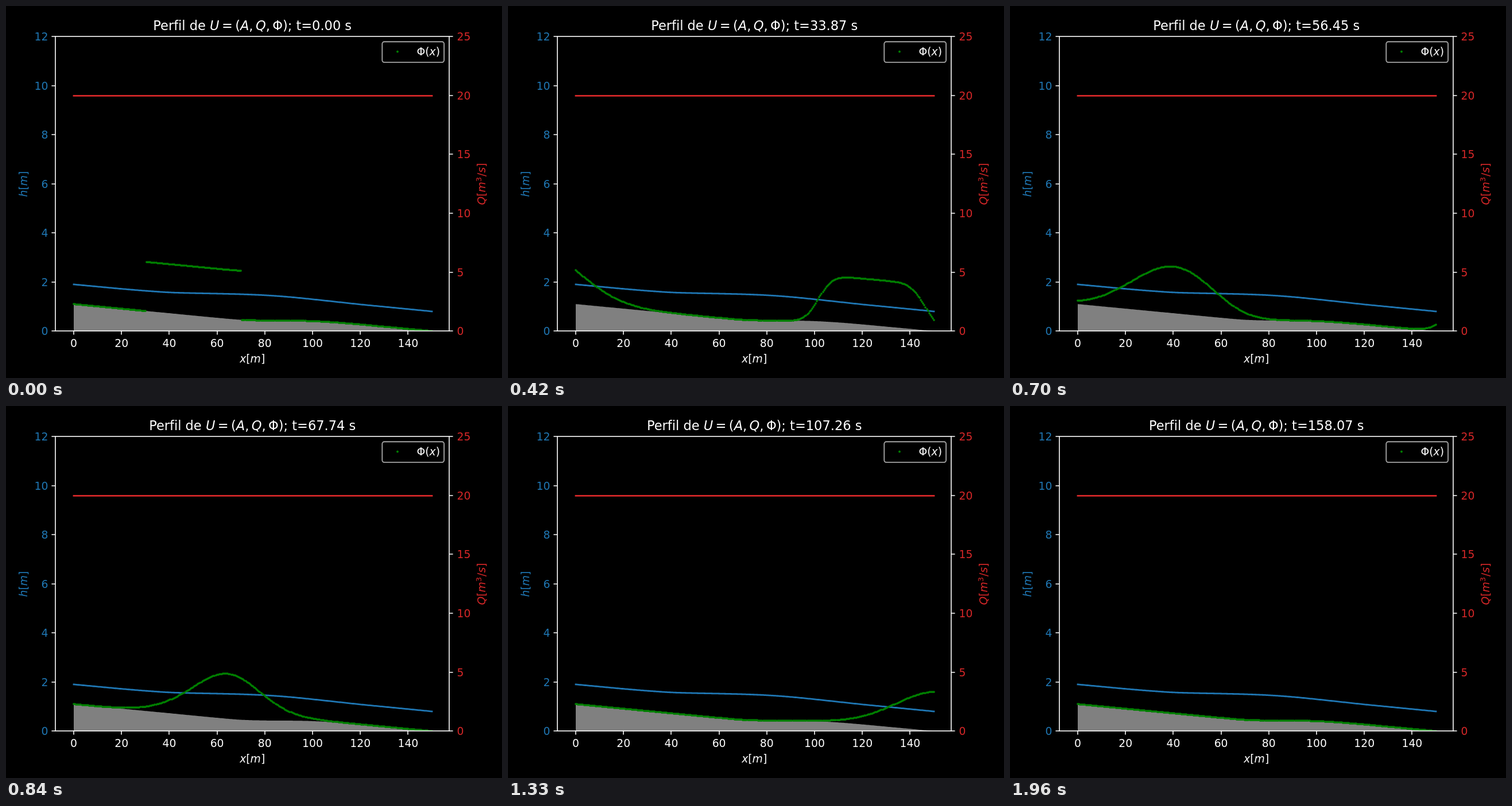
An HTML page for the animation above (2.03 s loop, 864 by 648 pixels).

```html
<!DOCTYPE html>
<html lang="es">
<head>
<meta charset="utf-8">
<title>Perfil</title>
<style>
  html, body { margin: 0; width: 100%; height: 100%; overflow: hidden; background: #000; }
  svg { display: block; width: 864px; height: 648px; }
  text {
    font: 18.75px "DejaVu Sans", Verdana, sans-serif;
    font-variant-ligatures: none;
    white-space: pre;
    fill: #fff;
  }
  .mid { text-anchor: middle; }
  .end { text-anchor: end; }
  #title { font-size: 22.5px; }
  .it { font-style: oblique; }
  .blue { fill: #1f77b4; }
  .red { fill: #d62728; }
  .line { fill: none; stroke-width: 2.8; stroke-linecap: square; stroke-linejoin: round; }
  .axis { fill: none; stroke: #fff; stroke-width: 1.6; }
</style>
</head>
<body>
<svg viewBox="0 0 864 648">
  <defs><clipPath id="plot"><rect x="86" y="53" width="686" height="513"/></clipPath></defs>
  <rect width="864" height="648"/>
  <g clip-path="url(#plot)">
    <path id="bed" fill="#808080"/>
    <path id="surface" class="line" stroke="#1f77b4"/>
    <path id="dots" fill="none" stroke="#008000" stroke-width="3.75" stroke-linecap="round"/>
    <path class="line" stroke="#d62728" d="M118 156.3H742"/>
  </g>
  <rect class="axis" x="86" y="53" width="686" height="513"/>
  <path id="ticks" class="axis"/>
  <g id="labels"></g>

  <rect x="655.3" y="62.3" width="107.8" height="35.8" rx="3.75" stroke="#ccc" stroke-opacity=".8" stroke-width="1.875"/>
  <circle cx="682" cy="79.5" r="1.9" fill="#008000"/>
  <text x="715.5" y="86">Φ(<tspan class="it">x</tspan>)</text>

  <text id="title" class="mid" x="429.2" y="42.2">Perfil de <tspan class="it">U</tspan><tspan dx="4.4">=</tspan><tspan dx="4.4">(</tspan><tspan class="it">A</tspan>,<tspan class="it" dx="4.4">Q</tspan>,<tspan dx="4.4">Φ</tspan>); t=<tspan id="clock">0.00</tspan> s</text>
  <text class="mid" x="429.2" y="621"><tspan class="it">x</tspan>[<tspan class="it">m</tspan>]</text>
  <text class="mid blue" transform="translate(37 310) rotate(-90)"><tspan class="it">h</tspan>[<tspan class="it">m</tspan>]</text>
  <text class="mid red" transform="translate(835.3 310) rotate(-90)"><tspan class="it">Q</tspan>[<tspan class="it">m</tspan><tspan dy="-7.2" font-size="13.1" style="font-size:13.1px">3</tspan><tspan dx="1" dy="7.2">/</tspan><tspan class="it">s</tspan>]</text>
</svg>
<script>
const $ = id => document.getElementById(id);
const LENGTH = 150, STEP = 0.5, COUNT = LENGTH / STEP + 1;
const FRAME_MS = 70, FRAMES = 29, FRAME_SECONDS = 5.6453;
const DECAY = 0.002, SPREAD = 0.12, INFLOW_TIME = 40, INFLOW_VAR = 50;

const px = x => 118 + 4.16 * x;
const py = v => 566.2 - 42.75 * v;

// Heights in metres, every 10 m along the channel.
const bedKnots = [1.1, 1.006, .914, .82, .727, .633, .54, .46, .43, .425, .405, .35, .27, .18, .09, 0];
const surfaceKnots = [1.9, 1.81, 1.72, 1.64, 1.575, 1.545, 1.525, 1.5, 1.46, 1.39, 1.295, 1.19, 1.085, .99, .895, .8];

function smooth(knots, x) {
  const last = knots.length - 1;
  const i = Math.min(Math.floor(x / 10), last - 1), u = x / 10 - i;
  const b = knots[i], c = knots[i + 1];
  const a = i > 0 ? knots[i - 1] : 2 * b - c;
  const d = i + 2 <= last ? knots[i + 2] : 2 * c - b;
  return b + u / 2 * (c - a + u * (2 * a - 5 * b + 4 * c - d + u * (3 * (b - c) + d - a)));
}

const xs = Array.from({ length: COUNT }, (_, i) => i * STEP);
const bed = xs.map(x => smooth(bedKnots, x));
const surface = xs.map(x => smooth(surfaceKnots, x));

// Travel time from the inlet; the flow speed is 2 / depth.
const travel = [0];
for (let i = 1; i < COUNT; i++) {
  const depth = (surface[i] - bed[i] + surface[i - 1] - bed[i - 1]) / 2;
  travel[i] = travel[i - 1] + STEP * depth / 2;
}
const travelAt = x => (travel[Math.floor(x / STEP)] + travel[Math.ceil(x / STEP)]) / 2;
const blockStart = travelAt(30.25), blockEnd = travelAt(70.25);

const normalCdf = z => 1 / (1 + Math.exp(-1.5976 * z - 0.07056 * z ** 3));

function concentration(tau, t) {
  const sigma = Math.max(Math.sqrt(SPREAD * t), 1e-5);
  const origin = tau - t;
  const block = Math.exp(-DECAY * t) *
    (normalCdf((origin - blockStart) / sigma) - normalCdf((origin - blockEnd) / sigma));
  const variance = INFLOW_VAR + SPREAD * tau;
  const inflow = Math.exp(-DECAY * tau) * Math.sqrt(INFLOW_VAR / variance) *
    Math.exp(-((t - tau - INFLOW_TIME) ** 2) / (2 * variance));
  return 2 * (block + inflow);
}

function drawStatic() {
  const trace = values => values.map((v, i) => px(xs[i]).toFixed(2) + " " + py(v).toFixed(2)).join("L");
  $("surface").setAttribute("d", "M" + trace(surface));
  $("bed").setAttribute("d", `M${px(0)} 566.2L${trace(bed)}V566.2Z`);

  let ticks = "", labels = "";
  const label = (x, y, cls, value) => labels += `<text x="${x}" y="${y}" class="${cls}">${value}</text>`;
  for (let x = 0; x <= 140; x += 20) {
    ticks += `M${Math.round(px(x))} 566v6.6`;
    label(px(x), 593.7, "mid", x);
  }
  for (let v = 0; v <= 12; v += 2) {
    ticks += `M86 ${Math.round(py(v))}h-6.6`;
    label(73.4, py(v) + 6.9, "end blue", v);
  }
  for (let q = 0; q <= 25; q += 5) {
    const y = py(q * 12 / 25);
    ticks += `M772 ${Math.round(y)}h6.6`;
    label(785.6, y + 6.9, "red", q);
  }
  $("ticks").setAttribute("d", ticks);
  $("labels").innerHTML = labels;
}

let shown = -1;
function render(ms) {
  const frame = Math.floor(ms / FRAME_MS) % FRAMES;
  if (frame === shown) return;
  shown = frame;
  const t = frame * FRAME_SECONDS;
  $("clock").textContent = t.toFixed(2);
  $("dots").setAttribute("d", xs.map((x, i) =>
    `M${Math.round(px(x))} ${Math.round(py(bed[i] + concentration(travel[i], t)))}h0`).join(""));
}

drawStatic();
render(0);
const start = performance.now();
(function tick() {
  render(performance.now() - start);
  requestAnimationFrame(tick);
})();
</script>
</body>
</html>
```
